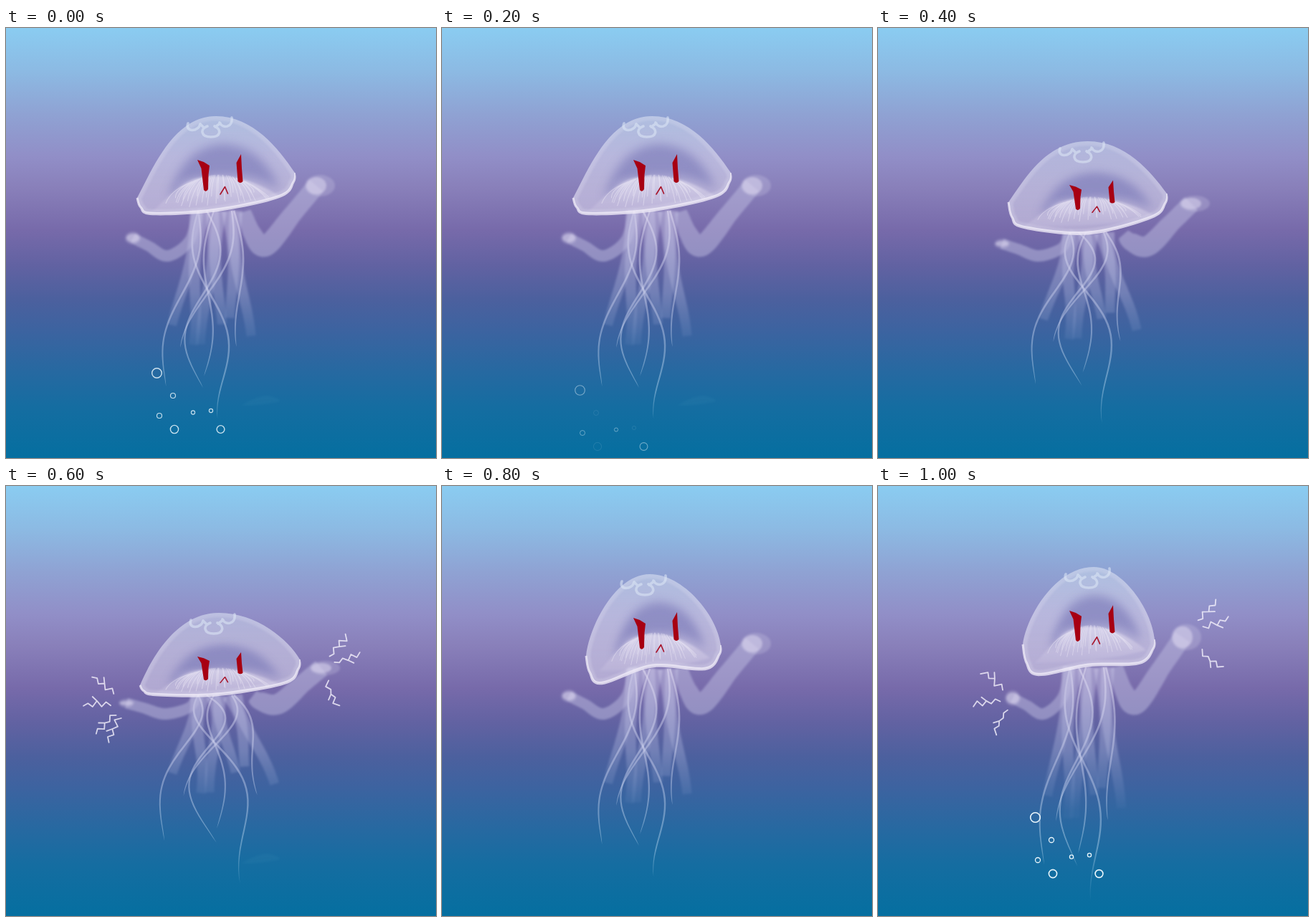
Write an HTML page that moves like this. It is 600 px wide and 600 px high and loops after 1200 ms.

```html
<!DOCTYPE html>
<html lang="en">
<head>
<meta charset="utf-8">
<title>Jellyfish</title>
<style>
html, body { margin: 0; width: 100%; height: 100%; overflow: hidden; background: #056ea0; }
svg { display: block; width: 100%; height: 100%; }
</style>
</head>
<body>
<svg id="stage" viewBox="0 0 600 600">
  <defs>
    <linearGradient id="sea" x1="0" y1="0" x2="0" y2="1">
      <stop offset="0" stop-color="#8accf1"/>
      <stop offset=".1" stop-color="#8cbae3"/>
      <stop offset=".2" stop-color="#8fa2d3"/>
      <stop offset=".3" stop-color="#918ec7"/>
      <stop offset=".37" stop-color="#8980ba"/>
      <stop offset=".47" stop-color="#776aaa"/>
      <stop offset=".55" stop-color="#6262a2"/>
      <stop offset=".63" stop-color="#4c609e"/>
      <stop offset=".7" stop-color="#3d63a0"/>
      <stop offset=".8" stop-color="#2669a1"/>
      <stop offset=".88" stop-color="#156da1"/>
      <stop offset="1" stop-color="#056fa0"/>
    </linearGradient>
    <linearGradient id="skin" x1="0" y1="0" x2="0" y2="1">
      <stop offset="0" stop-color="#d3e0f0" stop-opacity=".46"/>
      <stop offset=".45" stop-color="#d8d8ee" stop-opacity=".55"/>
      <stop offset="1" stop-color="#dcd6ee" stop-opacity=".58"/>
    </linearGradient>
    <linearGradient id="lace" x1="0" y1="0" x2="0" y2="1">
      <stop offset="0" stop-color="#f0ecf8" stop-opacity=".62"/>
      <stop offset=".5" stop-color="#e6e0f2" stop-opacity=".34"/>
      <stop offset="1" stop-color="#e0d8ee" stop-opacity=".12"/>
    </linearGradient>
    <linearGradient id="thread" gradientUnits="userSpaceOnUse" x1="0" y1="250" x2="0" y2="570">
      <stop offset="0" stop-color="#e2dcf2" stop-opacity=".5"/>
      <stop offset=".45" stop-color="#c4cbea" stop-opacity=".46"/>
      <stop offset=".8" stop-color="#a2c8e4" stop-opacity=".5"/>
      <stop offset="1" stop-color="#8fc0dc" stop-opacity=".1"/>
    </linearGradient>
    <linearGradient id="veil" gradientUnits="userSpaceOnUse" x1="0" y1="250" x2="0" y2="450">
      <stop offset="0" stop-color="#cdc8e8" stop-opacity=".46"/>
      <stop offset=".6" stop-color="#aeb6de" stop-opacity=".36"/>
      <stop offset="1" stop-color="#8fa8d6" stop-opacity=".05"/>
    </linearGradient>
    <filter id="soft1" x="-20%" y="-20%" width="140%" height="140%"><feGaussianBlur stdDeviation=".7"/></filter>
    <filter id="soft2" x="-40%" y="-40%" width="180%" height="180%"><feGaussianBlur stdDeviation="1.8"/></filter>
    <filter id="soft7" x="-30%" y="-50%" width="160%" height="200%"><feGaussianBlur stdDeviation="7"/></filter>
  </defs>
  <rect width="600" height="600" fill="url(#sea)"/>
</svg>
<script>
const stage = document.getElementById('stage');
const HOLD = 200;
const WAVE = 235;

const lerp = (a, b, t) => a + (b - a) * t;
const fix = n => n.toFixed(1);
const join = pts => 'M' + pts.map(p => p.map(fix)).join('L');
const path = (d, attrs) => `<path d="${d}" ${attrs}/>`;
const line = (d, color, width, more = '') =>
  path(d, `fill="none" stroke="${color}" stroke-width="${width}" stroke-linecap="round" stroke-linejoin="round" ${more}`);
const oval = (x, y, rx, ry, opacity, more = '') =>
  `<ellipse cx="${x}" cy="${y}" rx="${rx}" ry="${ry}" fill="#dad5ee" opacity="${opacity}" ${more}/>`;

function random(seed) {
  return () => {
    seed = (seed * 16807) % 2147483647;
    return seed / 2147483647;
  };
}

// Catmull-Rom samples through the given points
function spline(pts, steps = 12) {
  const out = [], at = i => pts[Math.max(0, Math.min(pts.length - 1, i))];
  for (let i = 0; i < pts.length - 1; i++) {
    const [a, b, c, d] = [at(i - 1), at(i), at(i + 1), at(i + 2)];
    for (let k = 0; k < steps; k++) {
      const t = k / steps;
      out.push([0, 1].map(j => b[j] + t * (c[j] - a[j]) / 2
        + t * t * (a[j] - 2.5 * b[j] + 2 * c[j] - d[j] / 2)
        + t * t * t * (1.5 * (b[j] - c[j]) + (d[j] - a[j]) / 2)));
    }
  }
  return [...out, at(pts.length)];
}

// Band along a curve; width(u) gives its full thickness
function ribbon(curve, width) {
  const left = [], right = [], last = curve.length - 1;
  curve.forEach(([x, y], i) => {
    const p = curve[Math.max(0, i - 1)], q = curve[Math.min(last, i + 1)];
    const dx = q[0] - p[0], dy = q[1] - p[1], len = Math.hypot(dx, dy) || 1;
    const h = width(i / last) / 2;
    left.push([x - dy / len * h, y + dx / len * h]);
    right.unshift([x + dy / len * h, y - dx / len * h]);
  });
  return join(left.concat(right)) + 'Z';
}

// Each hanging strand: root x, end x, end y, swing
const THREADS = [
  [268, 220, 500, 13], [280, 268, 502, 22], [268, 311, 545, -16],
  [318, 330, 445, 9], [290, 275, 486, -10], [315, 258, 446, 16]
];
const VEILS = Array.from({ length: 6 }, (_, i) =>
  [266 + 11 * i, 236 + 20 * i, 425 + 22 * Math.sin(i * 1.4 - .5), i % 2 ? -6 : 5]);

function tentacles([shift, spread, lift, slope, curve]) {
  const hang = ([root, end, bottom, swing]) => Array.from({ length: 41 }, (_, i) => {
    const t = i / 40, y = lerp(255, bottom, t), depth = (y - 255) / 290;
    const x = lerp(root, end, t) + swing * Math.sin((y - 255) / WAVE * 2 * Math.PI);
    return [x + depth * (shift + spread * (x - 250) / 50),
      y + lift + slope * depth + curve * depth * depth];
  });
  const veils = VEILS.map(v => path(ribbon(hang(v), u => 18 - 5 * u), 'fill="url(#veil)"'));
  const threads = THREADS.map(v =>
    path(ribbon(hang(v), u => 4.2 * Math.sqrt(1 - u) * (.6 + .6 * u)), 'fill="url(#thread)"'));
  return `<g filter="url(#soft2)">${veils.join('')}</g><g filter="url(#soft1)">${threads.join('')}</g>`;
}

// Arm drops from the shoulder, sags, then lifts to the tip
function arm([sx, sy], [x, y], sag, sagY, [w0, w1], [rx, ry], halo) {
  const at = u => lerp(sx, x, u);
  const curve = spline([[sx, sy], [at(.11), lerp(sy, sagY, .65)], [at(sag), sagY],
    [at(lerp(sag, 1, .55)), lerp(sagY, y, .55)], [x, y]]);
  const limb = ribbon(curve, u => w0 + (w1 - w0) * Math.sin(Math.PI * Math.min(.75, u)));
  return `<g filter="url(#soft2)">${path(limb, 'fill="#bdbbe0" opacity=".5"')}
    ${oval(x + halo, y, rx + 1 + halo, ry + 2, .24)}${oval(x, y, rx - 1, ry - 1, .55)}</g>`;
}

function arms({ leftTip, rightTip, hem, tall }) {
  const drop = Math.max(0, hem - 254);
  return arm([333 + drop * .3, hem + 2], rightTip, .3 + drop * .002, 304, [17, 29], [15, 13 * tall], 5)
    + arm([266, hem + 2], leftTip, .45, 318, [12, 16], [10, 7 * tall], 0);
}

function strands() {
  const rnd = random(11);
  let d = '';
  for (let i = 0; i < 30; i++) {
    const u = (i + rnd()) / 30, x0 = 256 + 82 * u, x1 = 212 + 166 * u;
    const y0 = 216 - 11 * Math.sin(Math.PI * u);
    const end = .55 + .45 * rnd();
    d += `M${fix(x0)},${fix(y0)}Q${fix(lerp(x0, x1, .6))},${fix(y0 + 11)} ${fix(lerp(x0, x1, end))},${fix(lerp(y0, 254 - 15 * u * u, end))}`;
  }
  return d;
}

function bell(pose, id) {
  const { left: [lx, ly], top: [tx, ty], right: [rx, ry], lip, hem, flare, squash } = pose;
  const a = tx - lx, b = ly - ty, c = rx - tx, e = ry - ty;
  const dome = [`M${lx},${ly}C${lx + a * flare},${ly - b * .36} ${tx - a * .54},${ty} ${tx},${ty}`,
    `C${tx + c * .47},${ty} ${rx - c * flare},${ry - e * .42} ${rx},${ry}`].join('');
  const brim = spline([[rx, ry], [rx - 2, ry + 13], [rx - 22, ry + 33], [293, hem],
    [lx + 22, ly + lip], [lx + 5, ly + lip * .6], [lx, ly]]);
  const shape = dome + join(brim).replace('M', 'L') + 'Z';
  const rim = ribbon(brim, u => 1.6 + 3.2 * Math.sin(Math.PI * Math.min(.85, u)));
  const narrow = flare < .1 ? .82 : 1;
  const shift = fix(ty + 61 - 184 * squash);
  const petals = 'M254,133C249,146 269,145 271,134M281,137C270,141 272,152 286,152C300,152 301,142 291,137M298,132C302,141 317,139 315,125M271,134L275,138M292,138L299,133';
  return `<clipPath id="${id}">${path(shape, '')}</clipPath>
    ${path(shape, 'fill="url(#skin)" filter="url(#soft1)"')}
    <g clip-path="url(#${id})">
      <g transform="translate(${fix(300 * (1 - narrow))} ${shift}) scale(${narrow} ${squash})">
        ${path('M226,238C240,195 258,166 302,162C350,164 372,198 382,226C350,206 325,207 302,206C268,207 248,222 226,238Z',
          'fill="#7d7bb9" opacity=".68" filter="url(#soft7)"')}
        ${path('M202,258C225,238 245,214 270,209C300,203 340,206 390,240C340,252 270,258 202,258Z',
          'fill="url(#lace)" filter="url(#soft2)"')}
        ${oval(262, 223, 20, 11, .45, 'filter="url(#soft7)"')}
        ${line(strands(), '#f4f0fa', 1.1, 'opacity=".42" filter="url(#soft1)"')}
      </g>
      ${line(shape, '#e6e4f4', 12, 'opacity=".24" filter="url(#soft2)"')}
    </g>
    ${path(rim, 'fill="#f0ecf8" opacity=".78" filter="url(#soft1)"')}
    <g transform="translate(${tx - 293} ${ty - 123})">
      ${line(petals, '#dfe9f7', 3.6, 'opacity=".55" filter="url(#soft1)"')}</g>
    <g transform="translate(0 ${shift}) scale(1 ${squash})">
      ${path('M267,184L276,187L284,192L282.5,205L282,225Q279,230 276,226L272.5,196Z', 'fill="#a70012"')}
      ${path('M328,176L329,196L330.5,214Q327,218 323.5,214L321.5,188Z', 'fill="#a70012"')}
      ${line('M299,232L305.5,221.5L309.5,231', '#a81228', 1.6)}
    </g>`;
}

// Jagged bolts fanning out from an arm tip
function sparks([x, y], angles, reach, seed) {
  const rnd = random(seed);
  return angles.map(deg => {
    const cos = Math.cos(deg * Math.PI / 180), sin = Math.sin(deg * Math.PI / 180);
    const bolt = Array.from({ length: 7 }, (_, i) => {
      const r = lerp(reach - 38, reach, i / 6), side = (i % 2 ? 1 : -1) * (1 + 4 * rnd());
      return [x + r * cos - side * sin, y + r * sin + side * cos];
    });
    const [bx, by] = bolt[3];
    const fork = join([bolt[3], [bx + 6 * cos - 6 * sin, by + 6 * sin + 6 * cos]]);
    return line(join(bolt) + fork, '#f3f0fb', 1.8, 'opacity=".82"');
  }).join('');
}

// x, y, radius
const BUBBLES = [[210.5, 481.5, 6.8], [233, 513, 3.5], [214, 541, 3.5], [235, 560, 5.6],
  [261, 536.5, 2.6], [286, 534, 2.6], [299.5, 560, 5.4]];
const bubbles = (dx, dy, width, shade) => BUBBLES.map(([x, y, r], i) =>
  `<circle cx="${x + dx}" cy="${y + dy}" r="${r}" fill="none" stroke="#eaf6fb" stroke-width="${r > 5 ? width : width * .8}" opacity="${shade(i)}"/>`).join('');

const glint = path('M328,527Q350,513 366,513Q380,516 383,521Q355,527 328,527Z',
  'fill="#4b9bbd" opacity=".1" filter="url(#soft2)"');

const wide = {
  left: [183, 237], top: [293, 123], right: [403, 202], lip: 22, hem: 254, flare: .2, squash: 1,
  leftTip: [177, 293], rightTip: [433, 220], tall: 1, bend: [0, 0, 0, 0, 0]
};
const sinking = {
  left: [182, 243], top: [293, 158], right: [403, 231], lip: 35, hem: 286, flare: .2, squash: .8,
  leftTip: [173, 301], rightTip: [437, 245], tall: .7, bend: [4, 15, 30, -125, 102]
};
const low = {
  left: [187, 278], top: [297, 177], right: [410, 242], lip: 13, hem: 291, flare: .14, squash: .76,
  leftTip: [168, 303], rightTip: [440, 254], tall: .62, bend: [10, 24, 37, -172, 145]
};
const narrow = { ...wide, left: [201, 237], top: [290, 123], right: [389, 222], lip: 38, hem: 251, flare: .05 };
const rising = {
  left: [202, 221], top: [301, 113], right: [386, 214], lip: 42, hem: 250, flare: .05, squash: .98,
  leftTip: [188, 296], rightTip: [425, 211], tall: 1.25, bend: [7, -6, -2, 36, 0]
};

const scenes = [
  [wide, glint + bubbles(0, 0, 1.4, () => .85)],
  [wide, glint + bubbles(-18, 24, 1.1, i => i % 2 ? .1 : .45)],
  [sinking, ''],
  [low, glint + sparks(low.leftTip, [219, 178, 136, 116], 60, 5) + sparks(low.rightTip, [-52, -20, 68], 58, 9)],
  [narrow, ''],
  [rising, bubbles(9, -19, 1.6, () => 1)
    + sparks(rising.leftTip, [222, 172, 118], 56, 21) + sparks(rising.rightTip, [-46, -23, 39], 70, 33)]
].map(([pose, extra], i) => {
  const g = document.createElementNS('http://www.w3.org/2000/svg', 'g');
  g.innerHTML = tentacles(pose.bend) + arms(pose) + bell(pose, 'bell' + i) + extra;
  stage.append(g);
  return g;
});

function update(time) {
  const current = Math.floor(time / HOLD) % scenes.length;
  scenes.forEach((g, i) => g.setAttribute('visibility', i === current ? 'visible' : 'hidden'));
}

const start = performance.now();
function tick() {
  update(performance.now() - start);
  requestAnimationFrame(tick);
}
tick();
</script>
</body>
</html>
```
